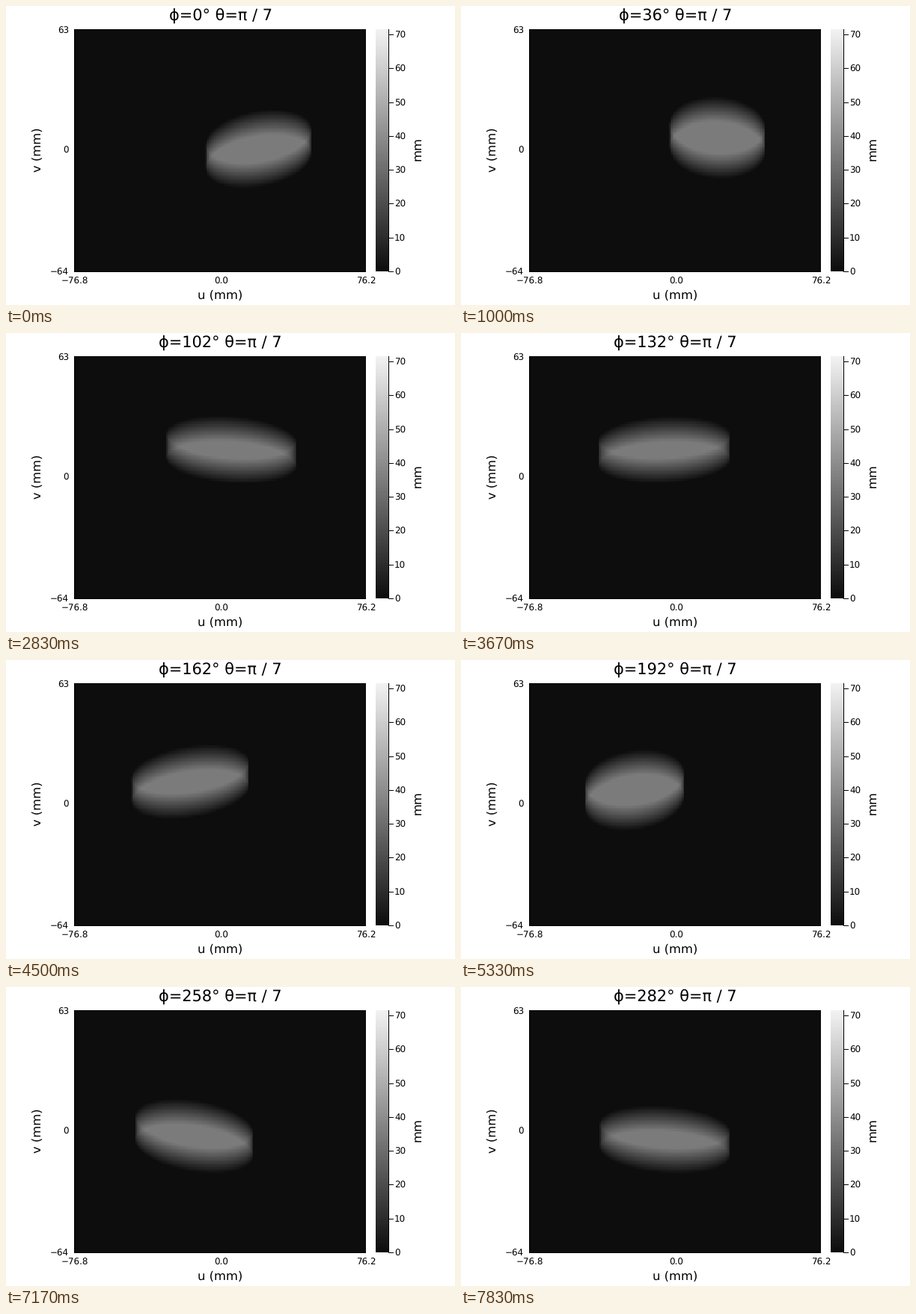
A matplotlib script that plays this animation: 600x400 px, repeating every 8 s.

```python
import numpy as np
import matplotlib as mpl
import matplotlib.pyplot as plt
from matplotlib.animation import FuncAnimation

W, H, DPI = 600, 400, 100
LOOP_MS, TICK_MS = 8000, 20
VIEWS, STEP_DEG = 48, 6

# Elliptical cylinder (mm), tilted in-plane by ROT and seen at elevation THETA
CENTER = np.array([20.0, 10.0, 5.0])
RADII = (25.0, 35.0)
HEIGHT = 15.0
ROT = np.pi / 6
THETA = np.pi / 7
PEAK = np.hypot(2 * max(RADII), HEIGHT)

# Plot area and colorbar, in pixels
LEFT, RIGHT, TOP, BOTTOM = 91, 481, 31, 355
BAR_L, BAR_R = 494, 511
EDGE = 0.2  # the plot area starts this far above its first full row
NU, NV, DU, DV = 256, 128, 0.6, 1.0

TITLE, GUIDE, TICK = 20.9, 16.4, 11.94  # em sizes in pixels

mpl.rcParams.update({
    "font.family": "DejaVu Sans",
    "text.hinting": "none",
})


def detector():
    """Detector coordinates (u, v) of every screen pixel in the plot area."""
    w, h = RIGHT - LEFT, BOTTOM - TOP
    i = np.floor((np.arange(w) + 0.5) / w * NU)
    j = np.floor((np.arange(h) + 0.5 + EDGE) / (h + EDGE) * NV)
    u = (i - NU / 2) * DU
    v = (NV / 2 - 1 - j) * DV
    return np.meshgrid(u, v)


U, V = detector()


def spin(x, y):
    """Rotate into the cylinder's frame and scale to a unit circle."""
    c, s = np.cos(ROT), np.sin(ROT)
    return (c * x + s * y) / RADII[0], (c * y - s * x) / RADII[1]


def projection(phi):
    """Length of each parallel ray inside the cylinder."""
    cp, sp = np.cos(phi), np.sin(phi)
    ct, st = np.cos(THETA), np.sin(THETA)
    x = U * cp + V * sp * st - CENTER[0]
    y = U * sp - V * cp * st - CENTER[1]
    z = V * ct - CENTER[2]

    px, py = spin(x, y)
    dx, dy = spin(-sp * ct, cp * ct)
    a = dx * dx + dy * dy
    b = px * dx + py * dy
    disc = b * b - a * (px * px + py * py - 1)
    root = np.sqrt(np.maximum(disc, 0))

    enter = np.maximum((-b - root) / a, (-HEIGHT / 2 - z) / st)
    leave = np.minimum((-b + root) / a, (HEIGHT / 2 - z) / st)
    return np.where(disc > 0, np.maximum(leave - enter, 0), 0)


fig = plt.figure(figsize=(W / DPI, H / DPI), dpi=DPI, facecolor="white")
ax = fig.add_axes([0, 0, 1, 1])
ax.axis("off")


def label(x, y, text, em, **kw):
    kw.setdefault("ha", "center")
    return ax.text(x, y, text, fontsize=em * 72 / DPI, color="black",
                   va="baseline", **kw)


def bar(x0, y0, x1, y1):
    """Black rule covering whole pixels."""
    ax.add_patch(plt.Rectangle((x0, y0), x1 - x0, y1 - y0, fc="black",
                               lw=0, antialiased=False))


def shade(data, box):
    cmap = mpl.colors.LinearSegmentedColormap.from_list(
        "soft", [(0.0512,) * 3, (0.951,) * 3], N=256)
    return ax.imshow(data, extent=box, cmap=cmap, vmin=0, vmax=PEAK,
                     interpolation="nearest", aspect="auto")


views = [projection(np.radians(n * STEP_DEG)) for n in range(VIEWS)]
image = shade(views[0], (LEFT, RIGHT, BOTTOM, TOP))
ramp = np.linspace(PEAK, 0, BOTTOM - TOP)[:, None]
shade(ramp, (BAR_L, BAR_R, BOTTOM, TOP))
ax.set_xlim(0, W)
ax.set_ylim(H, 0)

bar(LEFT, TOP, LEFT + 1, BOTTOM)
bar(LEFT, BOTTOM, RIGHT, BOTTOM + 1)
bar(BAR_R, TOP, BAR_R + 1, BOTTOM + 1)

for value in range(0, 80, 10):
    y = BOTTOM - value * (BOTTOM - TOP + EDGE) / PEAK
    row = round(y)
    bar(BAR_R, row, BAR_R + 7, row + 1)
    label(519, y + 4.9, str(value), TICK, ha="left")

for x, text in ((92, "\u221276.8"), (287.3, "0.0"), (481, "76.2")):
    label(x, 371.7, text, TICK)
for y, text in ((37.2, "63"), (197, "0"), (359.4, "\u221264")):
    label(84, y, text, TICK, ha="right")

label(286.5, 391.8, "u (mm)", GUIDE)
for x, y, text in ((47, 192, "v (mm)"), (554.5, 191.5, "mm")):
    label(x, y, text, GUIDE, rotation=90, rotation_mode="anchor")
title = label(286.7, 18.2, "", TITLE)


def draw(k):
    # Each view starts on the nearest 10 ms, sampled at the middle of a tick
    ms = (k + 0.5) * TICK_MS
    n = int((ms + 5) * VIEWS / LOOP_MS) % VIEWS
    image.set_data(views[n])
    title.set_text(f"\u03d5={n * STEP_DEG}° θ=π / 7")
    return image, title


anim = FuncAnimation(fig, draw, frames=LOOP_MS // TICK_MS, interval=TICK_MS,
                     repeat=True, repeat_delay=0)
plt.show()
```
